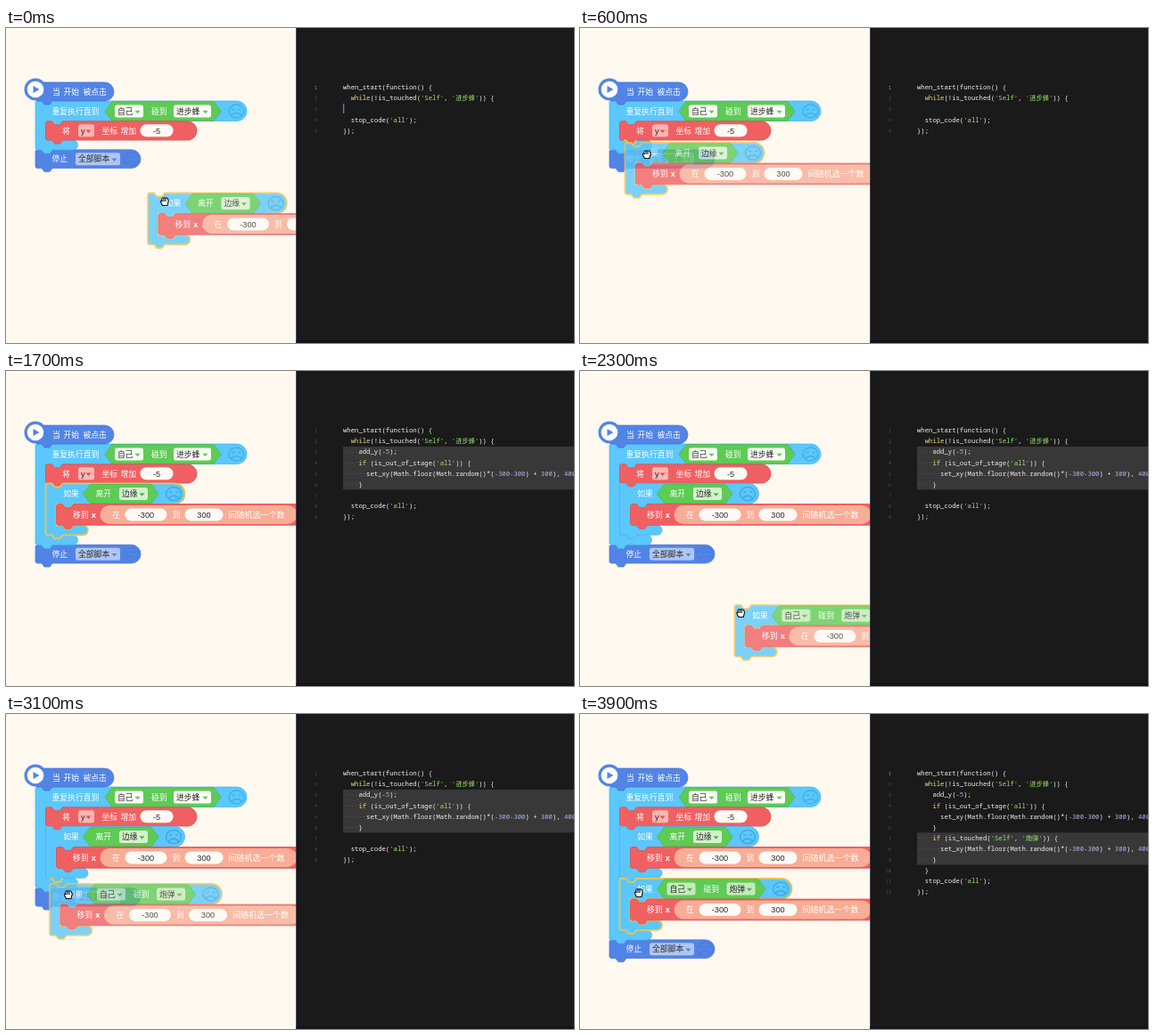
Recreate the animation shown at these times as an HTML page with a canvas. Size 637 by 354 pixels, loop 4400 ms.

```html
<!DOCTYPE html>
<html lang="zh">
<head>
<meta charset="utf-8">
<style>
html, body { margin: 0; width: 637px; height: 354px; overflow: hidden; background: #fff9ef; }
canvas { display: block; }
</style>
</head>
<body>
<canvas id="stage" width="637" height="354"></canvas>
<script>
const W = 637, H = 354, SPLIT = 325.5, LOOP = 4400;
const BRANCH = 58.5;
const CJK = '"Noto Sans CJK SC", "Noto Sans CJK", sans-serif';
const LABEL = `500 8.8px ${CJK}`;
const NUMBER = '9.2px "Liberation Sans", Arial, sans-serif';
const CODE = `500 7.25px "Noto Sans Mono", ${CJK}, monospace`;
const COLOR = {
  blue: ['#5284e6', '#4272d4'], cyan: ['#5bc7fb', '#43b3ec'],
  red: ['#f06062', '#dc494f'], green: ['#5ecb55', '#48b544'],
  salmon: '#f8ad96', yellow: '#f0c44c', ink: '#292929'
};

const screen = document.getElementById('stage').getContext('2d');
const layer = Object.assign(document.createElement('canvas'), { width: W, height: H }).getContext('2d');
let g = screen;

function paint(path, [fill, edge], selected) {
  g.fillStyle = fill;
  g.fill(path);
  g.strokeStyle = selected ? COLOR.yellow : edge;
  g.lineWidth = selected ? 1.7 : 0.7;
  g.stroke(path);
}

function text(str, x, y, color = '#fff', font = LABEL, align = 'left') {
  g.font = font;
  g.fillStyle = color;
  g.textAlign = align;
  g.textBaseline = 'alphabetic';
  g.fillText(str, x, y + 3.2);
}

function pill(x, y, w, h, fill, r = h / 2) {
  g.fillStyle = fill;
  g.beginPath();
  g.roundRect(x, y, w, h, r);
  g.fill();
}

// Connector bump, traced left to right or back again.
function bump(p, x, y, back) {
  const pts = [[7, 0], [10, 4], [16, 4], [19, 0]];
  if (back) pts.reverse();
  for (const [dx, dy] of pts) p.lineTo(x + dx, y + dy);
}

function blockPath(x, y, w, h, mouth = 0, notch = true) {
  const p = new Path2D(), r = h / 2;
  let bottom = y + h;
  p.moveTo(x, y + 1.5);
  p.lineTo(x + 1.5, y);
  if (notch) bump(p, x, y);
  p.lineTo(x + w - r, y);
  p.arc(x + w - r, y + r, r, -Math.PI / 2, Math.PI / 2);
  if (mouth) {
    const inner = x + 12, lip = bottom + mouth;
    bump(p, inner, bottom, true);
    p.lineTo(inner, bottom);
    p.lineTo(inner, lip);
    bump(p, inner, lip);
    p.lineTo(x + 42, lip);
    p.arc(x + 42, lip + 5.5, 5.5, -Math.PI / 2, Math.PI / 2);
    bottom = lip + 11;
  }
  bump(p, x, bottom, true);
  p.lineTo(x + 1.5, bottom);
  p.lineTo(x, bottom - 1.5);
  p.closePath();
  return p;
}

function hexagon(x, cy, w) {
  const p = new Path2D(), h = 10.8;
  p.moveTo(x, cy);
  p.lineTo(x + 8, cy - h);
  p.lineTo(x + w - 8, cy - h);
  p.lineTo(x + w, cy);
  p.lineTo(x + w - 8, cy + h);
  p.lineTo(x + 8, cy + h);
  p.closePath();
  paint(p, COLOR.green);
}

function field(str, x, cy, w, fill, arrow, font = LABEL) {
  pill(x, cy - 7, w, 14, fill, 2.5);
  text(str, x + 3, cy, COLOR.ink, font);
  const ax = x + w - 9.5;
  g.fillStyle = arrow;
  g.beginPath();
  g.moveTo(ax, cy - 0.8);
  g.lineTo(ax + 6, cy - 0.8);
  g.lineTo(ax + 3, cy + 2.7);
  g.fill();
}

function numberPill(str, x, cy, w) {
  pill(x, cy - 7, w, 14, '#fffaf5');
  text(str, x + w / 2, cy, COLOR.ink, NUMBER, 'center');
}

function padIcon(cx, cy, color) {
  g.strokeStyle = color;
  g.lineWidth = 1.5;
  g.beginPath();
  g.ellipse(cx, cy, 8.5, 7.5, 0, 0, 7);
  g.moveTo(cx - 6, cy + 5);
  g.quadraticCurveTo(cx, cy - 1, cx + 6, cy + 5);
  g.moveTo(cx - 5, cy - 2);
  g.lineTo(cx - 1.5, cy - 2);
  g.moveTo(cx + 2, cy - 2);
  g.lineTo(cx + 5, cy - 2);
  g.stroke();
}

function startBlock() {
  paint(blockPath(33, 61, 88, 21, 0, false), COLOR.blue);
  pill(20.5, 56.5, 25, 25, COLOR.blue[0]);
  pill(23.7, 59.7, 18.6, 18.6, '#fff');
  g.fillStyle = COLOR.blue[0];
  g.beginPath();
  g.moveTo(30.5, 65);
  g.lineTo(37.5, 69);
  g.lineTo(30.5, 73);
  g.fill();
  text('当', 52, 71.3);
  text('开始', 64.5, 71.3);
  text('被点击', 86.5, 71.3);
}

function loopBlock(mouth) {
  const cy = 93.5;
  paint(blockPath(33, 82, 237, 22.5, mouth), COLOR.cyan);
  text('重复执行直到', 51.5, cy);
  hexagon(111, cy, 130);
  field('自己', 122, cy, 32, '#fafdf4', COLOR.green[0]);
  text('碰到', 163, cy);
  field('进步蜂', 188, cy, 42, '#fafdf4', COLOR.green[0]);
  padIcon(258.5, cy, '#43b0e8');
}

function moveBlock() {
  const cy = 115.3;
  paint(blockPath(44.5, 104.8, 169.5, 21.3), COLOR.red);
  text('将', 63, cy);
  field('y', 81, cy, 18, '#f9b6b4', '#df5054', NUMBER);
  text('坐标', 107.5, cy);
  text('增加', 128.5, cy);
  numberPill('-5', 150.5, cy, 37);
}

function stopBlock(y) {
  const cy = y + 10.4;
  paint(blockPath(33, y, 118, 20.8), COLOR.blue);
  text('停止', 51.5, cy);
  field('全部脚本', 78, cy, 50, '#b0c6f1', COLOR.blue[0]);
  padIcon(140, cy, '#4c7cdc');
}

function branchBlock(x, y, hitsTarget, selected) {
  const cy = y + 11.8, row = cy + 23.3;
  const shift = hitsTarget ? 37 : 0;
  paint(blockPath(x, y, 156 + shift, 23.2, 23.8), COLOR.cyan, selected);
  text('如果', x + 19.8, cy);
  hexagon(x + 42, cy, 84.5 + shift);
  if (hitsTarget) {
    field('自己', x + 53, cy, 32, '#c3eabb', COLOR.green[1]);
    text('碰到', x + 94, cy);
    field('炮弹', x + 120, cy, 32, '#c3eabb', COLOR.green[1]);
  } else {
    text('离开', x + 56, cy);
    field('边缘', x + 82.5, cy, 32, '#d6f1ce', COLOR.green[1]);
  }
  padIcon(x + 143.5 + shift, cy, '#43a9e0');

  paint(blockPath(x + 12, y + 23.2, 300, 23.8), COLOR.red);
  text('移到', x + 30.5, row);
  text('x', x + 51.3, row, '#fff', 'bold ' + NUMBER);
  pill(x + 61, row - 10.5, 221, 21, COLOR.salmon);
  text('在', x + 74.5, row);
  numberPill('-300', x + 89, row, 47);
  text('到', x + 142, row);
  numberPill('300', x + 156, row, 43);
  text('间随机选一个数', x + 205, row, '#fff', `500 9px ${CJK}`);
}

function dragged(draw) {
  layer.clearRect(0, 0, W, H);
  g = layer;
  draw();
  g = screen;
  g.globalAlpha = 0.8;
  g.drawImage(layer.canvas, 0, 0);
  g.globalAlpha = 1;
}

function snapHint(y) {
  const p = new Path2D();
  p.moveTo(49, y);
  bump(p, 44.5, y);
  g.strokeStyle = COLOR.yellow;
  g.lineWidth = 2;
  g.stroke(p);
}

function ripple(y, age) {
  if (age < 0 || age > 200) return;
  g.strokeStyle = `rgba(110,120,135,${0.75 - age / 350})`;
  g.lineWidth = 3;
  g.beginPath();
  g.arc(57, y, 5 + age / 25, 0, 7);
  g.stroke();
}

function hand(x, y) {
  const p = new Path2D();
  p.moveTo(x - 2.5, y + 4.5);
  p.lineTo(x - 4.5, y + 0.5);
  p.quadraticCurveTo(x - 5, y - 1.5, x - 2.8, y - 0.5);
  p.lineTo(x - 3.2, y - 3);
  for (const dx of [-2, 0, 2]) p.arc(x + dx, y - 3, 1.2, Math.PI, 0);
  p.lineTo(x + 4.3, y - 1);
  p.lineTo(x + 3, y + 4.5);
  p.closePath();
  g.fillStyle = '#fff';
  g.fill(p);
  g.strokeStyle = '#111';
  g.lineWidth = 1.1;
  g.stroke(p);
  g.beginPath();
  for (const dx of [-1, 1]) {
    g.moveTo(x + dx, y - 2.5);
    g.lineTo(x + dx, y);
  }
  g.stroke();
}

// Position along [time, x, y] stops.
function along(stops, t) {
  const i = stops.findIndex(s => s[0] > t);
  if (i < 0) return stops.at(-1).slice(1);
  if (!i) return stops[0].slice(1);
  const a = stops[i - 1], b = stops[i], k = (t - a[0]) / (b[0] - a[0]);
  return [a[1] + (b[1] - a[1]) * k, a[2] + (b[2] - a[2]) * k];
}

const FIRST_DRAG = [[0, 159, 185.3], [600, 50.5, 128.8], [700, 49, 128]];
const SECOND_DRAG = [[1900, 236, 290], [2100, 200, 281], [2400, 160, 254],
  [2600, 148.5, 226.7], [2800, 98, 208], [3000, 50, 191], [3100, 49, 190.8]];
const POINTER = [[0, 178, 195], [600, 75, 142], [1000, 75, 143], [1200, 225, 125],
  [1400, 345, 105], [1700, 345, 300], [1800, 250, 310], [1900, 243, 299], [2100, 207, 290],
  [2400, 167, 263], [2600, 155, 235], [2800, 114, 219], [3000, 71, 204],
  [3100, 70, 203], [3900, 66, 201]];

function workspace(t) {
  const firstIn = t >= 800, secondIn = t >= 3300;
  const extra = BRANCH * (firstIn + secondIn);
  const base = 126.3, next = base + BRANCH;
  g.save();
  g.beginPath();
  g.rect(0, 0, SPLIT, H);
  g.clip();
  stopBlock(136.8 + extra);
  loopBlock(21.5 + extra);
  startBlock();
  moveBlock();
  if (firstIn) branchBlock(44.5, base, false, t < 1900);
  if (secondIn) branchBlock(44.5, next, true, true);
  if (!firstIn) {
    if (t >= 500) snapHint(base);
    dragged(() => branchBlock(...along(FIRST_DRAG, t), false, true));
  }
  if (t >= 1900 && !secondIn) {
    dragged(() => branchBlock(...along(SECOND_DRAG, t), true, true));
    if (t >= 2900) snapHint(next);
  }
  ripple(127, t - 800);
  ripple(next, t - 3300);
  hand(...along(POINTER, t));
  g.restore();
}

const MOVE = 'set_xy(Math.floor(Math.random()*(-300-300) + 300), 400);';
const HEAD = ['when_start(function() {', "  while(!is_touched('Self', '进步蜂')) {"];
const BODY = ['    add_y(-5);', "    if (is_out_of_stage('all')) {", '      ' + MOVE, '    }'];
const HIT = ["    if (is_touched('Self', '炮弹')) {", '      ' + MOVE, '    }', '  }'];
const TAIL = ["  stop_code('all');", '});'];
const STAGES = [
  { lines: [...HEAD, '', ...TAIL], from: 0, to: 0 },
  { lines: [...HEAD, ...BODY, '', ...TAIL], from: 2, to: 6 },
  { lines: [...HEAD, ...BODY, ...HIT, ...TAIL], from: 6, to: 9 }
];

function tokenColor(token) {
  if (token[0] === "'") return '#9be36c';
  if (/^(while|if)$/.test(token)) return '#e6dc7a';
  return /^-?\d+$/.test(token) ? '#a9b4ec' : '#f0f0ee';
}

function editor(t) {
  g.fillStyle = '#1a1a1a';
  g.fillRect(SPLIT, 0, W, H);
  g.fillStyle = '#15151c';
  g.fillRect(SPLIT, 0, 3, H);
  g.fillStyle = '#17101a';
  g.fillRect(SPLIT, 351, W, 3);
  const { lines, from, to } = STAGES[(t >= 1100) + (t >= 3500)];
  const lineY = i => 66.5 + i * 12.1, advance = 4.35;
  g.fillStyle = '#383838';
  if (to) g.fillRect(378, lineY(from) - 5.8, W - 378, (to - from) * 12.1);
  const firstLit = t < 1100 || t >= 3700;
  lines.forEach((line, i) => {
    const y = lineY(i), indent = line.search(/\S|$/);
    text(String(i + 1), 349, y - 0.6, i || !firstLit ? '#4b4b4b' : '#a0a0a0',
      '5.5px "Noto Sans Mono", monospace', 'right');
    if (i >= from && i < to) {
      g.fillStyle = '#606060';
      for (let c = 0; c < indent; c++) g.fillRect(379.7 + c * advance, y, 0.9, 0.9);
    }
    let x = 378 + indent * advance;
    for (const token of line.trim().split(/('[^']*'|\b(?:while|if)\b|-?\d+)/)) {
      if (!token) continue;
      text(token, x, y - 0.5, tokenColor(token), CODE);
      x += g.measureText(token).width;
    }
  });
  if (t < 300) {
    g.fillStyle = '#4b83e0';
    g.fillRect(378, 85, 1.3, 11);
  }
}

function frame(now) {
  const t = Math.floor(now % LOOP / 100) * 100;
  g.fillStyle = '#fff9ef';
  g.fillRect(0, 0, W, H);
  workspace(t);
  editor(t);
  requestAnimationFrame(tick);
}

let began;
function tick(now) {
  began ??= now;
  frame(now - began);
}
requestAnimationFrame(tick);
</script>
</body>
</html>
```
